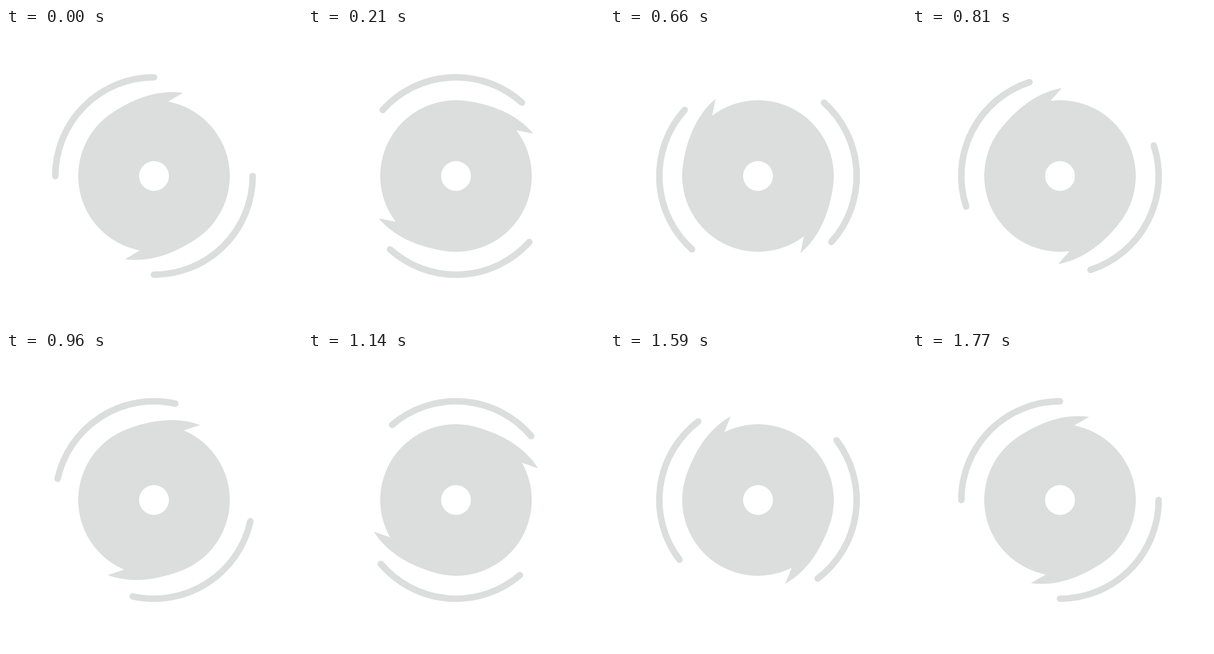
Animation of 500 by 500 pixels, one loop 1.8 s. Source, as an HTML page:

```html
<!DOCTYPE html>
<html lang="en">
<head>
<meta charset="utf-8">
<title>Spinning storm</title>
<style>
  html, body { margin: 0; height: 100%; overflow: hidden; background: #fff; }
  svg { display: block; width: 100vw; height: 100vh; }
</style>
</head>
<body>
<svg viewBox="-250 -250 500 500">
  <g id="storm" fill="#dbdedd">
    <path d="M24-125.7A128 128 0 0 1 68 108.5C27 135-12 145.5-49 140.5L-24 125.7A128 128 0 0 1-68-108.5C-27-135 12-145.5 49-140.5Z"/>
    <path d="M-166.7 0A166.7 166.7 0 0 1 0-166.7M166.7 0A166.7 166.7 0 0 1 0 166.7"
          fill="none" stroke="#dbdedd" stroke-width="11" stroke-linecap="round"/>
    <circle r="25.2" fill="#fff"/>
  </g>
</svg>
<script>
  const LOOP = 1800, STEP = 30;
  const storm = document.getElementById('storm');
  const start = performance.now();

  // The second half turn is one step shorter than the first.
  const angle = step => step <= 30 ? step * 6 : 180 + (step - 30) * 180 / 29;

  function draw(now) {
    const step = Math.floor(Math.max(0, now - start) % LOOP / STEP);
    storm.setAttribute('transform', `rotate(${angle(step)})`);
    requestAnimationFrame(draw);
  }
  draw(start);
</script>
</body>
</html>
```
